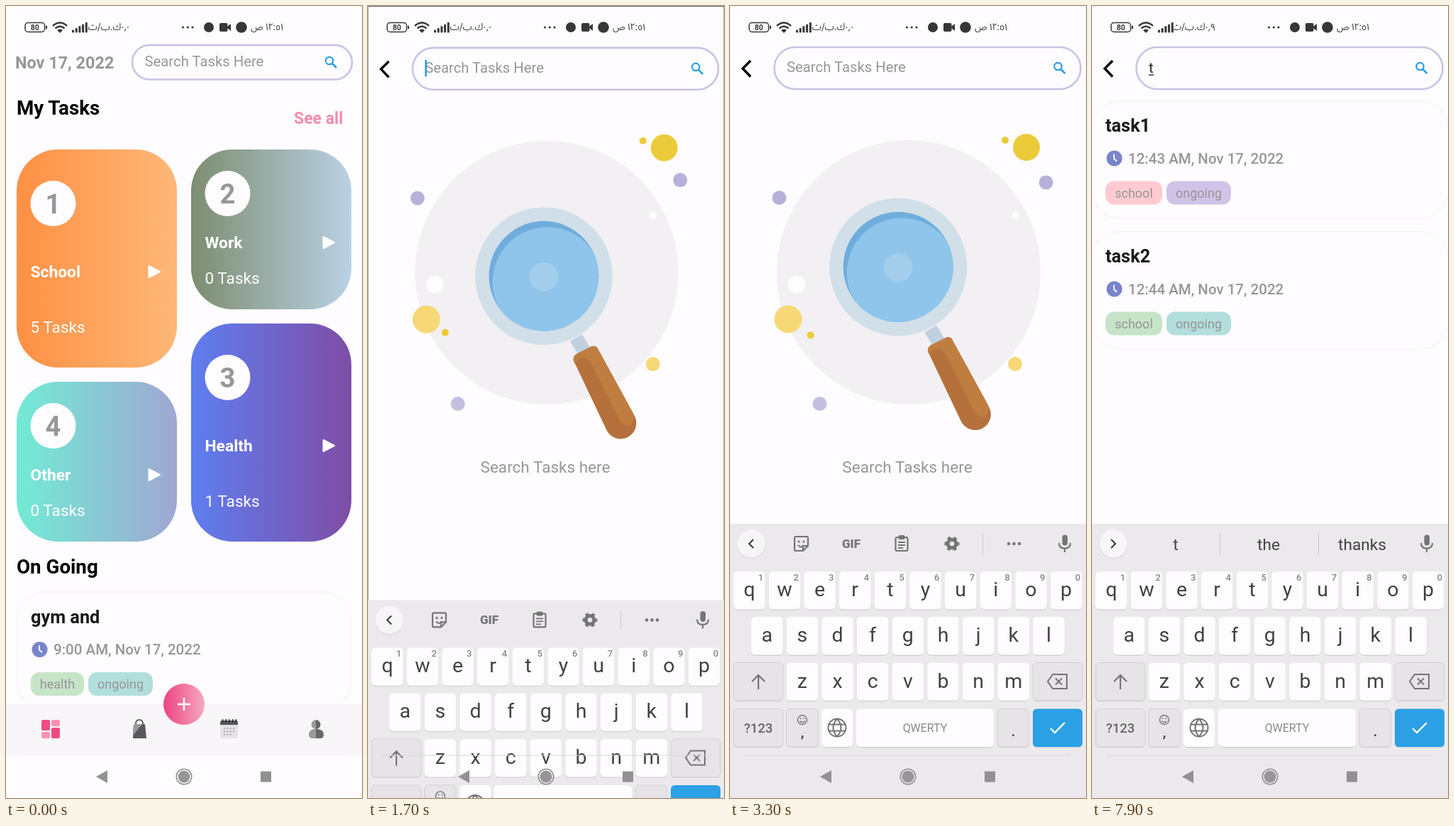
An HTML page for the animation above (8000 ms loop, 502 by 1115 pixels).

```html
<!DOCTYPE html>
<html lang="en">
<head>
<meta charset="utf-8">
<title>Task planner</title>
<style>
html, body { margin: 0; width: 100%; height: 100%; overflow: hidden; background: #fefcfe; }
svg { display: block; width: 502px; height: 1115px; font-family: Roboto, sans-serif; }
</style>
</head>
<body>
<svg id="stage" viewBox="0 0 502 1115"></svg>
<script>
const GREY = '#979698', INK = '#424144', ICON = '#757477', LILAC = '#c9c3e3', BLUE = '#2b9de2';

const rect = (x, y, w, h, r, fill, more = '') =>
  `<rect x="${x}" y="${y}" width="${w}" height="${h}" rx="${r}" fill="${fill}" ${more}/>`;
const disc = (x, y, r, fill, more = '') => `<circle cx="${x}" cy="${y}" r="${r}" fill="${fill}" ${more}/>`;
const shape = (d, fill, more = '') => `<path d="${d}" fill="${fill}" ${more}/>`;
const line = (d, color, width = 2, more = '') =>
  shape(d, 'none', `stroke="${color}" stroke-width="${width}" ${more}`);
const text = (x, y, size, str, fill = GREY, weight = 400, anchor = 'start', more = '') =>
  `<text x="${x}" y="${y}" font-size="${size}" fill="${fill}" font-weight="${weight}" text-anchor="${anchor}" ${more}>${str}</text>`;
const group = (id, body, more = '') => `<g id="${id}" ${more}>${body}</g>`;
const at = (x, y, body) => `<g transform="translate(${x} ${y})">${body}</g>`;
const gradient = (id, from, to) =>
  `<linearGradient id="${id}"><stop stop-color="${from}"/><stop offset="1" stop-color="${to}"/></linearGradient>`;

const lensIcon = (x, y) => at(x, y,
  disc(-2, -2, 5.2, 'none', `stroke="${BLUE}" stroke-width="2.2"`) + line('M2 2L8 8', BLUE, 2.6));

function searchBox(x, y, w, h) {
  return rect(x, y, w, h, h / 2, '#fefcfe', `stroke="${LILAC}" stroke-width="2.6"`);
}

function category(n, name, count, x, y, tall) {
  const [circle, arrow, tasks] = tall ? [76, 172, 258] : [62, 131, 189];
  return at(x, y,
    rect(0, 0, 226, tall ? 307 : 225, 58, `url(#card${n})`) +
    disc(51.5, circle, 32, '#fefcfe') +
    text(51.5, circle + 13.5, 38, n, GREY, 700, 'middle') +
    text(19.5, arrow + 8, 22.8, name, '#fff', 700) +
    shape(`M186.500 ${arrow - 8}L202 ${arrow}L186.500 ${arrow + 8}Z`, '#fff',
      'stroke="#fff" stroke-width="2" stroke-linejoin="round"') +
    text(19.5, tasks, 22.6, count + ' Tasks', '#fff'));
}

function task(x, y, w, title, time, tag, tagWidth, tagFill, stateFill) {
  return at(x, y,
    rect(0, 0, w, 165, 40, '#fefcfe', 'stroke="#f4f2f4"') +
    text(20, 43.5, 25.3, title, '#1b191c', 700) +
    disc(32.5, 81, 11, '#7785c9') + line('M32 75V81.500L36 85', '#fff', 1.8) +
    text(52, 88, 20.5, time, GREY, 500) +
    rect(20, 113, tagWidth, 33, 12, tagFill) +
    text(20 + tagWidth / 2, 136, 18, tag, GREY, 400, 'middle') +
    rect(tagWidth + 26, 113, 91, 33, 12, stateFill) +
    text(tagWidth + 71.5, 136, 18, 'ongoing', GREY, 400, 'middle'));
}

function tabBar() {
  const pink = '#ef4b80', light = '#f892b2';
  let days = '';
  for (let i = 0; i < 11; i++) days += rect(307 + i % 4 * 4.3, 1016 + (i >> 2) * 4.3, 2, 2, 0, '#aaa8aa');
  let rings = '';
  for (let i = 0; i < 5; i++) rings += rect(304.5 + i * 4.7, 1004, 2, 5, 1, '#343335');
  return rect(0, 983, 502, 72, 0, '#f8f6f8') +
    rect(50, 1005, 12, 15, 2, pink) + rect(64, 1005, 12, 9, 2, light) +
    rect(50, 1022, 12, 9, 2, light) + rect(64, 1016, 12, 15, 2, pink) +
    line('M183 1013V1010Q183 1005 188 1005T193 1010V1013', '#4a494c', 1.6) +
    shape('M180 1011H196L198 1031H179Z', '#59585b') + shape('M180 1011H192L179 1027Z', '#9b999c') +
    rect(302, 1006, 25, 25, 3, '#e5e3e5') + shape('M302 1012V1009Q302 1006 305 1006H324Q327 1006 327 1009V1012Z', '#565558') +
    rings + days +
    shape('M437 1005A6.500 6.500 0 0 0 437 1018H434Q427 1019 427 1026Q427 1031 432 1031H437Z', '#9c9a9d') +
    shape('M437 1005A6.500 6.500 0 0 1 437 1018H440Q448 1019 448 1026Q448 1031 443 1031H437Z', '#68676a') +
    disc(251, 983, 29, 'url(#add)') + line('M242 983H260M251 974V992', '#fff', 2.4);
}

const home = text(13, 88, 23.4, 'Nov 17, 2022', GREY, 700) +
  searchBox(178, 55, 310, 48.5) + text(195.5, 85, 20.3, 'Search Tasks Here') + lensIcon(458, 79) +
  text(15, 153, 27.7, 'My Tasks', '#000', 700) +
  text(406, 166, 23, 'See all', '#f48cae', 700) +
  category(1, 'School', 5, 15, 202, true) + category(2, 'Work', 0, 261, 202, false) +
  category(3, 'Health', 1, 261, 447, true) + category(4, 'Other', 0, 15, 529, false) +
  text(15, 798.5, 27.7, 'On Going', '#000', 700) +
  task(15, 825, 472, 'gym and', '9:00 AM, Nov 17, 2022', 'health', 75, '#c7e4c8', '#b2dedb') +
  tabBar() + rect(0, 1055, 502, 60, 0, '#fefcfe') + line('M20 1055H482', '#f2f0f2', 1);

const glass = shape('M267 451L284 441L296 461L279 470Z', '#c0d0df') +
  shape('M276 469L298 458Q304 457 306 461L358 556A22 22 0 0 1 319 577L272 478Q271 472 276 469Z', '#b5703b') +
  shape('M276 469L298 458Q304 457 306 461L356 552Q359 568 350 570Q342 570 338 564L298 484Q292 472 282 475Q275 478 274 483L272 478Q271 472 276 469Z', '#c07d42') +
  disc(230, 359, 97, '#d1dfe9') + disc(230, 359, 77.5, '#70addd') +
  disc(235, 367.5, 77.5, '#8fc5eb', 'clip-path="url(#lens)"') + disc(230, 360, 20.5, '#a2cdeb');

const empty = text(80, 93, 20.3, 'Search Tasks Here') +
  disc(252, 375, 186, '#f2f0f3') +
  disc(418, 199, 19, '#eccb3a') + disc(388, 189, 5, '#eccb3a') +
  disc(69.5, 270, 10, '#b6b1d8') + disc(402.5, 294.5, 5, '#fefcfe') + disc(94, 392, 12.5, '#fefcfe') +
  disc(82, 441, 19.5, '#f6d876') + disc(126.5, 560, 10, '#c3c0df') + disc(402, 504, 10, '#f6d876') +
  group('drifters', disc(449, 251, 10, '#b6b1d8') + disc(117, 466, 5, '#eccb3a')) +
  group('glass', glass) +
  text(250, 657, 22.6, 'Search Tasks here', GREY, 400, 'middle');

const results = text(80, 94, 20.5, 't', '#2c2b2e') + line('M80 97H87', '#2c2b2e', 1.4) +
  task(-1, 133.5, 504, 'task1', '12:43 AM, Nov 17, 2022', 'school', 80, '#ffcbd1', '#d0c3e7') +
  task(-1, 317.5, 504, 'task2', '12:44 AM, Nov 17, 2022', 'school', 80, '#c7e4c8', '#b2dedb');

const search = rect(0, 0, 502, 1115, 0, '#fefcfe') + line('M29 77L18 88L29 99.500', '#000', 3.4) +
  searchBox(62.5, 58, 432, 59) + lensIcon(464.5, 87) +
  group('empty', empty) + group('results', results) + rect(80, 75, 2.6, 23.5, 0, BLUE, 'id="caret"');

function key(x, y, w, label = '', fill = '#fefcfe') {
  const flat = fill === '#e6e4e6';
  return rect(x, y + 1.2, w, 53.5, 5.5, '#cfcdcf') +
    rect(x, y, w, 53.5, 5.5, fill, flat ? 'stroke="#d2d0d2"' : '') +
    text(x + w / 2, y + 35, 28.5, label, INK, 400, 'middle');
}

function keyRow(letters, x, y, hints) {
  return [...letters].map((c, i) => {
    const left = x + i * 49.65;
    return key(left, y, 44.5, c) +
      (hints ? text(left + 38.5, y + 13, 13, (i + 1) % 10, '#858487', 500, 'middle') : '');
  }).join('');
}

function gear(x, y) {
  return at(x, y, disc(0, 0, 5.8, 'none', `stroke="${ICON}" stroke-width="5"`) +
    disc(0, 0, 8.6, 'none', `stroke="${ICON}" stroke-width="3.6" stroke-dasharray="4.5" stroke-dashoffset="2.2"`));
}

const tools = line('M33 751L27 757L33 763', INK, 2.2) +
  line('M93 747H108Q110 747 110 749V760L103 767H93Q91 767 91 765V749Q91 747 93 747ZM110 760H103V767', ICON, 2.2) +
  disc(97, 754, 1.6, ICON) + disc(104, 754, 1.6, ICON) + line('M96 759Q100 764 104 759', ICON, 2) +
  text(171, 763, 17, 'GIF', ICON, 900, 'middle') +
  rect(233.5, 748, 17, 19, 2, 'none', `stroke="${ICON}" stroke-width="2.2"`) + rect(237.5, 745, 9, 6, 2, ICON) +
  line('M237 755H247M237 759H247M237 763H244', ICON, 1.8) +
  gear(313, 757) + line('M356.500 743V771', '#cdcbcd', 1.2) +
  [393, 400.5, 408].map(x => disc(x, 757, 2.3, ICON)).join('');

const words = line('M27 751L33 757L27 763', INK, 2.2) + line('M180.500 742V772M319.500 742V772', '#cdcbcd', 1.2) +
  [['t', 118], ['the', 249], ['thanks', 381]].map(([w, x]) => text(x, 766, 22.7, w, INK, 400, 'middle')).join('');

const keyboard = rect(0, 729, 502, 800, 0, '#ebe9eb') +
  disc(30, 758, 20, '#d9d7d9') + disc(30, 757, 19.7, '#f7f5f7') +
  group('tools', tools) + group('words', words) +
  rect(468.5, 744.5, 7.5, 15, 3.7, ICON) + line('M464 756Q464 763.500 472 763.500T480 756M472 763V769', ICON, 2.2) +
  keyRow('qwertyuiop', 5, 796, true) + keyRow('asdfghjkl', 30, 860) + keyRow('zxcvbnm', 79.6, 924.5) +
  key(5, 924.5, 70, '', '#e6e4e6') + line('M40 962V942M31 951L40 942L49 951', ICON, 2.2) +
  key(427, 924.5, 70, '', '#e6e4e6') +
  line('M455 941H475V961H455L448 951ZM459 946.500L468 955.500M468 946.500L459 955.500', ICON, 2) +
  key(5, 989.5, 70, '', '#e6e4e6') + text(40, 1023, 18.5, '?123', '#656467', 500, 'middle') +
  key(79.6, 989.5, 44.5, '', '#e6e4e6') + text(102, 1029, 21, ',', INK, 500, 'middle') +
  disc(102, 1005, 6.5, 'none', `stroke="${ICON}" stroke-width="1.4"`) +
  disc(99.5, 1003, 1, ICON) + disc(104.5, 1003, 1, ICON) + line('M98.500 1006.500Q102 1010.500 105.500 1006.500', ICON, 1.3) +
  key(129, 989.5, 44.5) +
  line('M138.500 1016A12.500 12.500 0 0 0 163.500 1016A12.500 12.500 0 0 0 138.500 1016M151 1003.500Q140 1016 151 1028.500Q162 1016 151 1003.500M140 1011.500H162M140 1020.500H162', ICON, 2) +
  key(178, 989.5, 194) + text(275, 1022, 16, 'QWERTY', '#8b8a8d', 400, 'middle') +
  key(377, 989.5, 44.5, '', '#e6e4e6') + text(399.5, 1028, 21, '.', INK, 500, 'middle') +
  key(427, 989.5, 70, '', '#2ba0e4') + line('M452 1017L458 1023L472 1009', '#fff', 2.4);

const arabic = (id, x, str) => text(x, 34, 13.5, str, '#444346', 400, 'start',
  `id="${id}" direction="rtl" style="font-family:'Noto Sans Arabic','DejaVu Sans',sans-serif"`);

const DARK = '#373639';
const status = rect(27, 23.5, 27.5, 13, 4, 'none', `stroke="${DARK}" stroke-width="1.5"`) +
  rect(56, 27.5, 2, 5, 1, DARK) + text(40.7, 34, 10.5, '80', DARK, 700, 'middle') +
  line('M66 28Q76 19 86 28M69.500 31.500Q76 26 82.500 31.500', DARK, 2.5) + shape('M72 34Q76 31 80 34L76 38Z', DARK) +
  group('traffic', rect(78, 30, 11, 9, 0, '#fefcfe') +
    line('M81 38V32M79 34L81 31.500L83 34M86 31V37.500M84 35.500L86 38L88 35.500', DARK, 1.4)) +
  [0, 1, 2, 3, 4].map(i => rect(93 + i * 4.7, 33.5 - i * 2.6, 3, 4 + i * 2.6, 1, DARK)).join('') +
  arabic('speed', 174, '') +
  [249.5, 256.3, 263].map(x => disc(x, 30, 1.6, DARK)).join('') +
  disc(286, 30, 7, DARK) +
  rect(301, 24, 11.5, 12, 2, DARK) + shape('M312 29L317 25V35L312 31Z', DARK) +
  disc(332, 30, 7.8, DARK) + arabic('clock', 391, '١٢:٥١ ص');

const nav = shape('M127 1085L143 1076V1094Z', '#929093') +
  disc(251, 1085, 10.7, 'none', 'stroke="#929093" stroke-width="1.6"') + disc(251, 1085, 8.4, '#979598') +
  rect(359, 1077.5, 15, 15, 0, '#929093');

const defs = gradient('card1', '#ff9044', '#fdb878') + gradient('card2', '#7d8d70', '#bad1e5') +
  gradient('card3', '#5e7ef1', '#7e4da5') + gradient('card4', '#72ebd5', '#9fa7d3') +
  gradient('add', '#ee437f', '#f4a9c1') +
  `<clipPath id="lens">${disc(230, 359, 77.5, '#000')}</clipPath>`;

document.getElementById('stage').innerHTML = `<defs>${defs}</defs>` +
  rect(0, 0, 502, 1115, 0, '#fefcfe') + group('home', home) +
  rect(0, 0, 502, 1115, 0, '#000', 'id="scrim"') + group('search', search) +
  group('keyboard', keyboard) + group('navLine', line('M20 1055H480', '#d9d7d9', 1)) + status + nav;

const el = id => document.getElementById(id);
const show = (id, on) => el(id).setAttribute('display', on ? 'inline' : 'none');
const move = (id, value) => el(id).setAttribute('transform', value);
const clamp = v => Math.min(1, Math.max(0, v));
const zoom = s => `translate(251 557.500) scale(${s}) translate(-251 -557.500)`;

const OPEN = 1500, FOCUS = 1600, TYPED = 3350;

function draw(t) {
  const p = clamp((t - OPEN) / 300), opening = 1 - (1 - p) ** 4;
  const typed = t >= TYPED;
  show('home', p < 1);
  show('search', p > 0);
  show('scrim', p > 0);
  move('home', zoom(1 + 0.05 * opening));
  move('search', zoom(0.85 + 0.15 * opening));
  el('scrim').setAttribute('opacity', 0.6 * clamp(p * 3));
  el('search').setAttribute('opacity', clamp(p * 3));

  show('keyboard', t >= FOCUS);
  show('navLine', t >= FOCUS);
  move('keyboard', `translate(0 ${368 * (1 - clamp((t - FOCUS) / 300)) ** 3})`);
  show('tools', !typed);
  show('words', typed);
  show('empty', !typed);
  show('results', typed);

  const drift = (1 + Math.cos(2 * Math.PI * (t - 2800) / 2300)) / 2;
  move('glass', `translate(${18 * (1 - drift)} ${21 * (1 - drift)})`);
  move('drifters', `translate(${-8.5 * (1 - drift)} ${-6.5 * (1 - drift)})`);

  const blink = Math.floor((t - (typed ? TYPED : FOCUS)) / 500) % 2 === 0;
  show('caret', t >= FOCUS && blink);
  el('caret').setAttribute('x', typed ? 87.2 : 80);

  show('traffic', t >= 3700 && t < 7600);
  el('speed').textContent = (t < 5500 ? '٠,٠' : '٠,٩') + 'ك.ب/ث';
}

function tick() {
  draw(performance.now() % 8000);
  requestAnimationFrame(tick);
}
tick();
</script>
</body>
</html>
```
